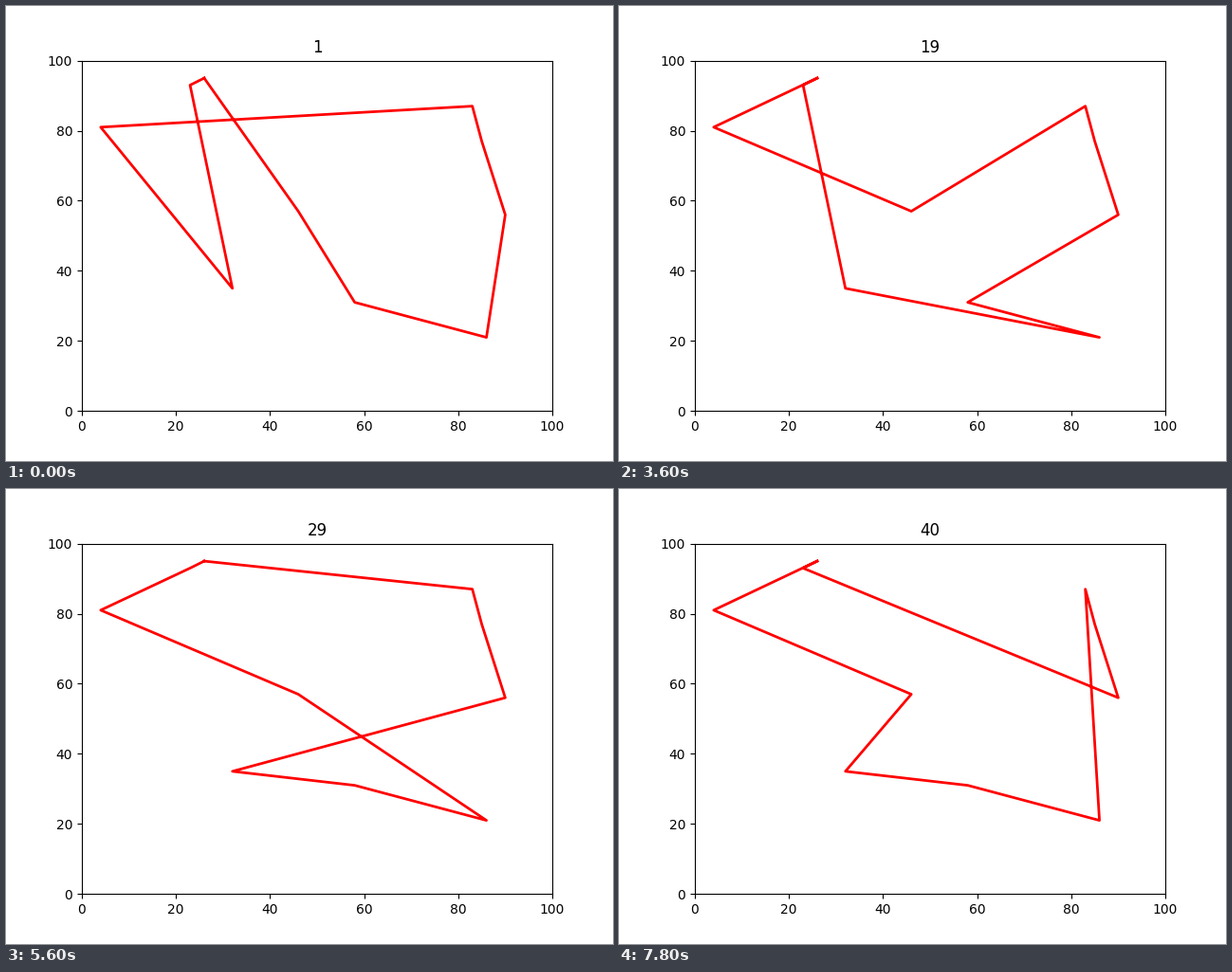
Write a matplotlib script that moves like this. It is 640 px wide and 480 px high and loops after 8 s.

```python
import matplotlib.pyplot as plt
from matplotlib.animation import FuncAnimation

CITIES = {
    "A": (26, 95), "B": (46, 57), "C": (58, 31), "D": (86, 21), "E": (90, 56),
    "F": (85, 77), "G": (83, 87), "H": (4, 81), "I": (32, 35), "J": (23, 93),
}

# Best tour found so far, keyed by the generation it first appears in
TOURS = {
    1: "ABCDEFGHIJ",
    14: "ABDICEFGJH",
    19: "AHBGFECDIJ",
    24: "AJHBDCIEFG",
    34: "AHBICDGFEJ",
}
GENERATIONS = 40

fig, ax = plt.subplots(figsize=(6.4, 4.8), dpi=100)
ax.set_xlim(0, 100)
ax.set_ylim(0, 100)
line, = ax.plot([], [], color="red", linewidth=2)
title = ax.set_title("")


def best_tour(generation):
    return TOURS[max(g for g in TOURS if g <= generation)]


def update(i):
    generation = i + 1
    tour = best_tour(generation)
    line.set_data(*zip(*(CITIES[c] for c in tour + tour[0])))
    title.set_text(str(generation))
    return line, title


anim = FuncAnimation(fig, update, frames=GENERATIONS, interval=200,
                     init_func=lambda: update(0), repeat=True, repeat_delay=0)
plt.show()
```
